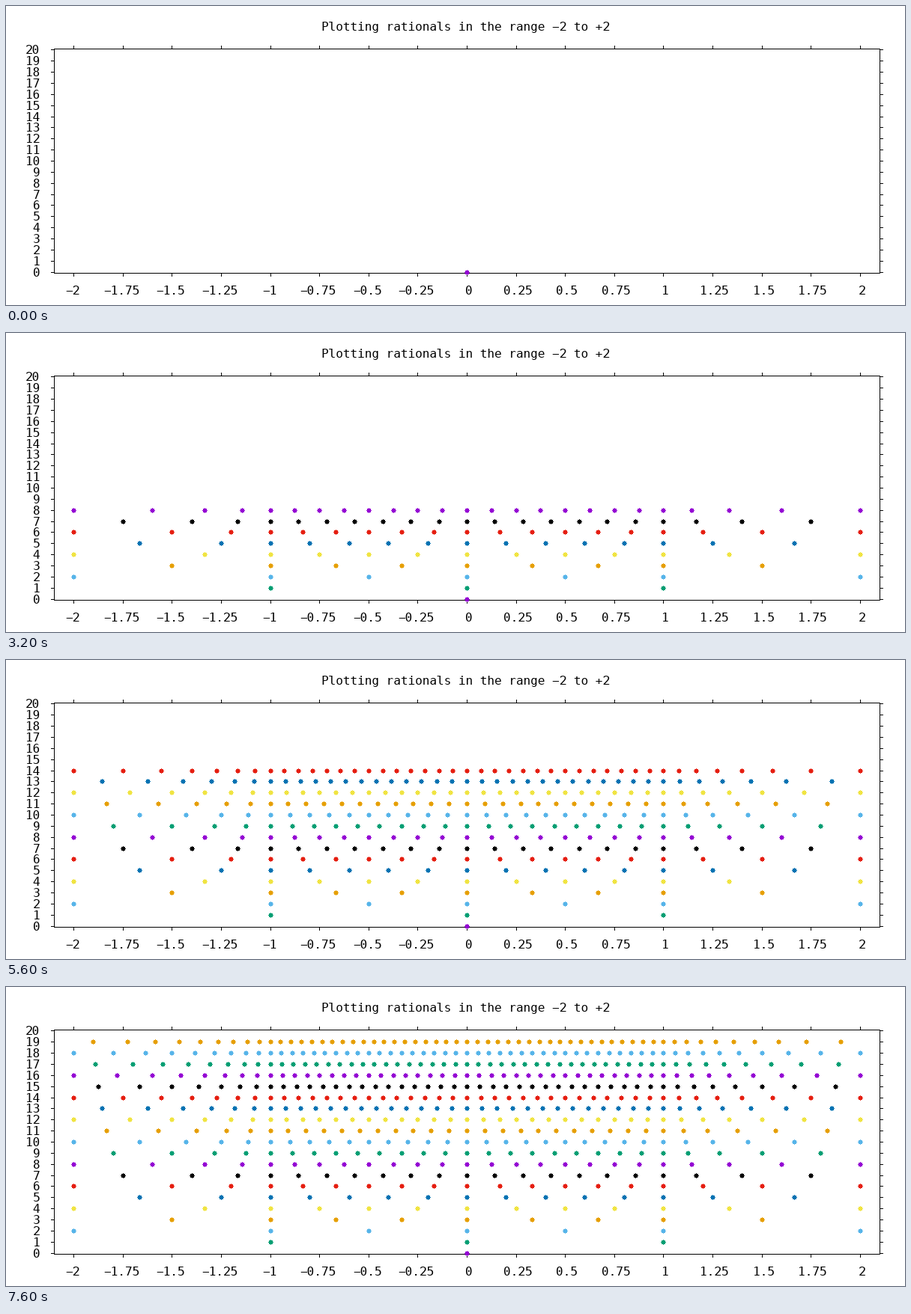
Animation of 1200 by 400 pixels, one loop 8000 ms. Source, as a matplotlib script:

```python
import numpy as np
import matplotlib.pyplot as plt
from matplotlib.animation import FuncAnimation
from matplotlib.collections import PolyCollection

W, H, DPI = 1200, 400, 100
LEFT, RIGHT, TOP, BOTTOM = 64, 1166, 57, 357
ROWS, STEP_MS = 20, 400
CELL = 9.63  # advance of one monospaced character
COLORS = ["#9400d3", "#009e73", "#56b4e9", "#e69f00",
          "#f0e442", "#0072b2", "#e51e10", "#000000"]

plt.rcParams["font.family"] = "DejaVu Sans Mono"
plt.rcParams["text.hinting"] = "default"


def px(value):
    return 615 + round(262.45 * value)


def py(row):
    return round(355.6 - 14.86 * row)


def rationals(n):
    """Fractions p/q in [-2, 2] whose larger part is n."""
    if n == 0:
        return [0]
    values = {p / n for p in range(n + 1)}
    values |= {n / q for q in range((n + 1) // 2, n + 1)}
    return sorted(values | {-v for v in values})


def rect(x, y, w, h):
    return [(x, y), (x + w, y), (x + w, y + h), (x, y + h)]


def add_polys(polys, color, z):
    shapes = PolyCollection(polys, facecolors=color, edgecolors="none",
                            linewidths=0, zorder=z)
    shapes.set_snap(False)
    ax.add_collection(shapes, autolim=False)
    return shapes


def label(x, baseline, text):
    ax.text(x, baseline, text, fontsize=16 * 72 / DPI, color="black",
            ha="left", va="baseline")


# Eight-pointed dot: a 5 px square with a 1 px tip on each side
STAR = np.array([(0, -3), (1, -3), (1, -2), (3, -2), (3, 0), (4, 0),
                 (4, 1), (3, 1), (3, 3), (1, 3), (1, 4), (0, 4),
                 (0, 3), (-2, 3), (-2, 1), (-3, 1), (-3, 0), (-2, 0),
                 (-2, -2), (0, -2)])

fig = plt.figure(figsize=(W / DPI, H / DPI), dpi=DPI, facecolor="white")
ax = fig.add_axes([0, 0, 1, 1])
ax.set_xlim(0, W)
ax.set_ylim(H, 0)
ax.axis("off")

width, height = RIGHT - LEFT + 1, BOTTOM - TOP + 1
lines = [rect(LEFT, TOP, width, 1), rect(LEFT, BOTTOM, width, 1),
         rect(LEFT, TOP, 1, height), rect(RIGHT, TOP, 1, height)]

for value in np.arange(-2, 2.25, 0.25):
    x = px(value)
    lines += [rect(x, TOP - 4, 1, 4), rect(x, BOTTOM + 1, 1, 4)]
    text = f"{value:g}".replace("-", "\u2212")
    shift = -1.5 if value < 0 else 2.5
    label(x + shift - len(text) * CELL / 2, 386, text)

for row in range(ROWS + 1):
    y = py(row)
    lines += [rect(LEFT - 4, y, 4, 1), rect(RIGHT + 1, y, 4, 1)]
    label(45.3 - len(str(row)) * CELL, y + 6, str(row))

add_polys(lines, "black", 1)
label(421, 33, "Plotting rationals in the range \u22122 to +2")

dots = [add_polys([STAR + (px(v), py(n)) for v in rationals(n)],
                  COLORS[n % len(COLORS)], 3) for n in range(ROWS)]


def update(frame):
    for n, row_dots in enumerate(dots):
        row_dots.set_visible(n <= frame)
    return dots


anim = FuncAnimation(fig, update, frames=ROWS, interval=STEP_MS,
                     init_func=lambda: update(0), repeat=True,
                     repeat_delay=0, blit=False)
plt.show()
```
